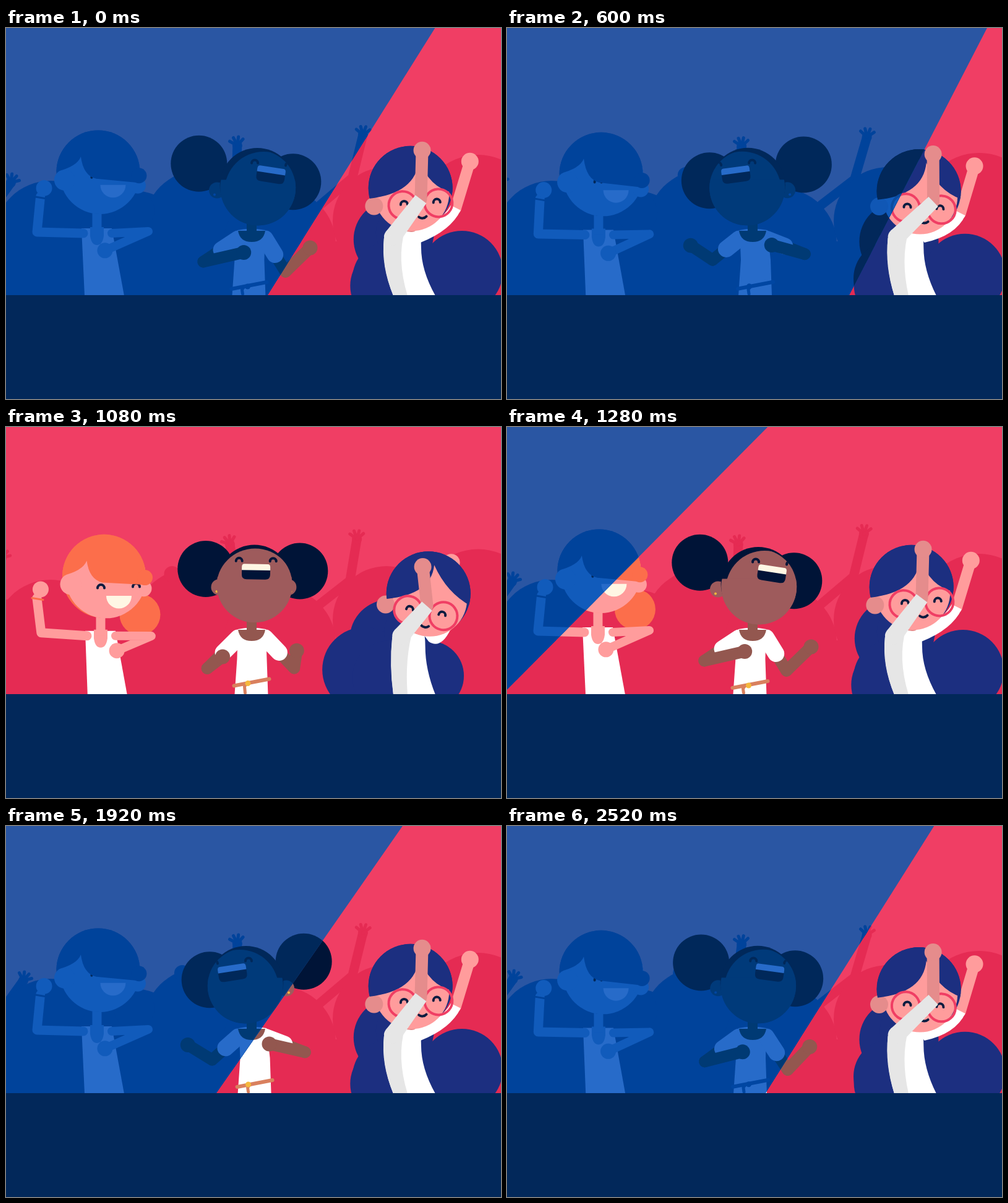
An HTML page with a canvas that plays this animation: 800x600 px, repeating every 2560 ms.

```html
<!DOCTYPE html>
<html lang="en">
<head>
<meta charset="utf-8">
<title>Dancing crowd</title>
<style>
  html, body { margin: 0; width: 100%; height: 100%; overflow: hidden; background: #02285a; }
  canvas { display: block; width: 800px; height: 600px; }
</style>
</head>
<body>
<canvas id="stage" width="800" height="600"></canvas>
<script>
const ctx = document.getElementById('stage').getContext('2d');
const LOOP = 2560, BEAT = 640, TAU = Math.PI * 2, FLOOR = 432;

// Each colour: [in red light, in blue light]
const colors = {
  bg: ['#f03e64', '#2a56a3'], crowd: ['#e52b53', '#00439b'],
  white: ['#ffffff', '#276bc9'], shade: ['#e6e6e6', '#2567c5'],
  skin: ['#ff9c9c', '#115bbb'], skinDark: ['#e58c8c', '#1057b5'],
  orange: ['#fc6e4b', '#00439b'], ink: ['#0a1c40', '#02285a'],
  brown: ['#9e5b5c', '#003a7a'], arm: ['#93574f', '#003a74'],
  black: ['#001437', '#00285a'], belt: ['#d9805e', '#0046a2'],
  gold: ['#f5b83d', '#0046a2'], teeth: ['#fff6e4', '#276bc9'],
  navy: ['#1c2f80', '#02285a'], frame: ['#f03e64', '#0b4ba0']
};
let mode = 0;
const col = name => colors[name][mode];

// Rhythm of the moment: w(mid, a, b) swings around mid once per beat
let w, bob;
function setBeat(t) {
  const c = Math.cos(TAU * t / BEAT);
  bob = -Math.sin(TAU * t / BEAT);
  w = (mid, a, b = 0) => mid + a * c + b * bob;
}

function circle(x, y, r) {
  ctx.beginPath();
  ctx.arc(x, y, r, 0, TAU);
}
function dot(c, x, y, r) {
  ctx.fillStyle = col(c);
  circle(x, y, r);
  ctx.fill();
}
function line(c, width, pts, cap = 'round') {
  ctx.strokeStyle = col(c);
  ctx.lineWidth = width;
  ctx.lineCap = cap;
  ctx.lineJoin = 'round';
  ctx.beginPath();
  pts.forEach(p => ctx.lineTo(p[0], p[1]));
  ctx.stroke();
}
function arc(c, width, x, y, r, from = Math.PI, to = TAU) {
  ctx.strokeStyle = col(c);
  ctx.lineWidth = width;
  ctx.lineCap = 'round';
  ctx.beginPath();
  ctx.arc(x, y, r, from, to);
  ctx.stroke();
}
function shape(c, d) {
  ctx.fillStyle = col(c);
  ctx.fill(new Path2D(d));
}
function group(x, y, angle, draw) {
  ctx.save();
  ctx.translate(x, y);
  ctx.rotate(angle);
  draw();
  ctx.restore();
}
function inCircle(x, y, r, draw) {
  group(x, y, 0, () => {
    circle(0, 0, r);
    ctx.clip();
    draw();
  });
}
const mix = (a, b, k) => a.map((v, i) => v + (b[i] - v) * k);

function crowdArm(hand, elbow, shoulder) {
  line('crowd', 15, [hand, elbow, shoulder]);
  const lean = Math.atan2(hand[0] - elbow[0], elbow[1] - hand[1]);
  group(hand[0], hand[1], lean, () => {
    dot('crowd', 0, 0, 8);
    for (let a = -1.1; a < 1; a += 0.6)
      line('crowd', 5, [[0, 0], [14 * Math.sin(a), -14 * Math.cos(a)]]);
  });
}

function crowd(t) {
  const slow = Math.sin(TAU * t / LOOP), half = Math.sin(TAU * t / 1280);
  crowdArm([w(559, 18, 16), w(173, 0, 9)], [w(553, 7, 6), w(242, 0, 7)], [508, 286]);
  crowdArm([w(353, 21, 18), w(187, 3, 4)], [372, 250], [360, 300]);
  const x = w(4, 4) - 20 * slow, y = w(222, 28);
  crowdArm([x, y], [x - 30, y + 42], [x - 50, y + 75]);

  const mid = 313 + 20 * half;
  dot('crowd', 4, w(290, 21, 18), 20);
  dot('crowd', 72, 338, 91);
  dot('crowd', 205, 356, 93);
  dot('crowd', mid, 320, 90);
  dot('crowd', mid - 28, 238, 13);
  dot('crowd', 442, 350, 91);
  dot('crowd', 615, 312, 87);
  dot('crowd', 763, w(301, 0, -8), 96);
  ctx.fillStyle = col('crowd');
  ctx.fillRect(0, 345, 800, 90);
}

function leftGirl() {
  const x = w(150.5, -1.5, 8), y = w(233, 0, 9);
  const fringeL = w(5, 6, 8), fringeR = w(6.5, 11.5, 13);
  const bx = w(150, -3, 2), top = w(323.5, 0.5, 7), low = w(130.5, -3.5);
  const hand = [w(61.5, 0, -6), w(255.5, 3.5, 9)], elbow = [w(55, -5), w(326, 4, 9)];
  const hand2 = [w(168.5, -8.5, 8), w(352.5, 7.5, 13)], elbow2 = [w(233.5, -3.5), w(327.5, 1.5, 12)];

  dot('orange', x + 58, y + 62, 33);
  shape('white', `M${bx - 25} ${top}H${bx + 24}L${low + 64} 433H${low}Z`);
  shape('skin', `M${bx - 11} ${top - 2}h22v14q-2 15 -11 15t-11 -15z`);
  line('skin', 15, [[bx, y + 55], [bx, top + 8]], 'butt');
  line('skin', 15, [[bx - 22, top + 8], elbow, [hand[0] - 6, hand[1] + 14]]);
  line('orange', 3, [[hand[0] - 14, hand[1] + 14], [hand[0] + 4, hand[1] + 17]]);
  line('skin', 14, [[bx + 24, top + 8], elbow2, hand2]);
  dot('skin', ...hand2, 12.5);

  dot('orange', x, y, 67.5);
  dot('skin', x + 3, y + 3, 65);
  dot('skin', x - 54, y + 13, 17);
  dot('skin', x + 64, y + 12 + fringeR * 0.55, 13);
  const eyeY = w(y + 9, 0, 11), mouthY = w(y + 20, 1, 13);
  arc('ink', 4, x - 5, eyeY, 5.5);
  arc('ink', 4, x + 52, eyeY - 2, 5.5);
  shape('teeth', `M${x + 3.5} ${mouthY}h41a20.5 20.5 0 0 1 -41 0z`);
  inCircle(x, y, 67.5, () => shape('orange',
    `M-80 -80H80V${fringeR}H72L-3 ${fringeL}Q-24 ${fringeL - 5} -28 -25Q-35 -6 -80 2Z`));
  dot('orange', x + 66, y + fringeR - 12, 12.5);
  dot('skin', ...hand, 13);
}

function middleGirl(t) {
  // turn runs from 1 (facing right) to -1 (facing left) over two beats
  const turn = 1.15 * Math.cos(TAU * (t - 100) / 1280), push = Math.sin(TAU * t / 1280);
  const fx = w(399.5 + 10 * turn, -2.5), fy = w(256, 2.5);
  const tx = 397 - 4.5 * turn, beltY = w(413.5, 2.5);
  const arms = [
    { s: [375, 341], e: [326 - 7 * turn, 378 - 15 * push],
      h: [w(336 + 44.5 * turn - 12 * push, 3), 358.5 + 4.5 * turn - 15 * push] },
    { s: [419, 341], e: [467.5 - 15.5 * turn, 380 + 14 * turn - 10 * push],
      h: [458.5 + 32.5 * turn - 9 * push, 354 + 1.5 * turn - 9 * push] }
  ];

  shape('white', `M${375 - turn} 327Q396 322 ${420 - turn} 327L${tx + 25} 375L${tx + 27} 433H${tx - 27}L${tx - 23} 375Z`);
  for (const a of arms) {
    line('arm', 19, [a.s, a.e]);
    line('white', 27, [a.s, mix(a.s, a.e, 0.48)]);
  }
  shape('arm', 'M375 328H419Q416 346 397 346T375 328Z');
  line('arm', 16, [[397, 305], [397, 332]], 'butt');
  line('belt', 6, [[tx - 28, beltY + 6], [tx + 29, beltY - 5]]);
  line('belt', 5, [[tx - 8, beltY + 3], [tx - 11, beltY + 7], [tx - 10, 430]]);
  dot('gold', tx - 6 + 4 * turn, beltY + 2, 4.5);
  for (const a of arms) {
    line('arm', 19, [a.e, a.h]);
    dot('arm', ...a.h, 12);
  }

  for (const side of [-1, 1]) {
    dot('black', 396.5 + side * 76 - 8.5 * turn - 4 * push, w(232, 2) + side * 14.5 * turn, 45.5);
  }
  for (const side of [-1, 1]) {
    dot('brown', fx + side * 56 - 10 * turn, fy + 4, 13);
    dot('gold', fx + side * 60 - 10 * turn, fy + 11, 2);
  }
  dot('black', fx - turn, fy - 4, 60.5);
  inCircle(fx, fy, 61, () => {
    dot('brown', 9 * turn, 4.5, 63);
    ctx.fillRect(-62, -13, 124, 80);
    for (const side of [-1, 1])
      arc('black', 4, 22 * turn + side * 27.5, -38 + side * 2 * turn, 5);
    group(20.5 * turn, -21.5, 0.15 * turn, () => {
      shape('black', 'M-23 -3H23V5Q23 13 15 13H-15Q-23 13 -23 5Z');
      shape('teeth', 'M-19 -12H19Q23 -12 23 -7V-2H-23V-7Q-23 -12 -19 -12Z');
    });
  });
}

function rightGirl() {
  const x = w(654, 0, 31), y = w(257, 2, 14);
  const sx = w(1.5, -1.5, 12);
  const hand = [w(641, 32, 48), w(209, -11, 14)], elbow = [w(641.5, 29.5, 54), w(279.5, -2.5, 10)];
  const hand2 = [w(713, 37, 22), w(203.5, 12.5, 22)], elbow2 = [w(701.5, 25.5, 20), w(302, -10, 20)];

  // long hair
  dot('navy', w(605, 21, 24), w(336, 6, 10), 64);
  dot('navy', w(577, 42, 20), w(399, 18), w(67, -4.5));
  dot('navy', w(686, 51, 18), w(392, 2, 12), w(59, 7));
  dot('navy', 645 + sx, 331, 47);
  dot('navy', 620, 405, 60);

  // far arm
  line('skin', 18, [elbow2, hand2]);
  dot('skin', ...hand2, 14);
  const [ex, ey] = elbow2;
  shape('white', `M${656 + sx} 328Q${ex - 24} ${ey + 24} ${ex - 8} ${ey - 5}L${ex + 8} ${ey + 3}`
    + `Q${ex - 8} ${ey + 36} ${670 + sx} 347Z`);

  // body
  const l = 611 + sx, r = 671 + sx / 2;
  shape('white', `M${l + 12} 326H${r - 4}Q${r} 335 ${r} 355Q${r} 392 694 433H626Q${l - 4} 385 ${l} 340Z`);
  shape('shade', `M${l + 12} 326H${l + 34}Q${l + 20} 374 649 433H626Q${l - 5} 385 ${l} 340Z`);
  line('skinDark', 20, [[642 + sx, 318], [656 + sx, 320]]);

  // head
  dot('navy', x, y, 68);
  dot('skin', x + 2, y + 9, 60.5);
  dot('skinDark', w(x - 57, -2, -14), w(y + 29, 0, -12), 14.5);
  inCircle(x, y, 68, () => {
    const part = 14 - 5 * bob;
    shape('navy', `M-80 -80H80V${8 + 14 * bob}H70Q30 0 ${part} -46Q${part - 5} ${9 - 8 * bob} -67 ${17 - 9 * bob}H-80Z`);
  });
  group(w(x + 16, 0, -22), w(y + 26, 0, 6), w(-6, 2.5, 18) * Math.PI / 180, () => {
    for (const side of [-1, 1]) {
      arc('frame', 4, side * 29, 0, 22.5, 0, TAU);
      arc('ink', 4, side * 26.5, -1, 5.5);
    }
    arc('frame', 4, 0, 0, 8, Math.PI * 1.15, Math.PI * 1.85);
    arc('ink', 4, 2, 14, 9, 0.8, 2.3);
  });

  // near arm
  line('skinDark', 20, [elbow, hand]);
  dot('skinDark', ...hand, 14);
  const dx = elbow[0] - 625 - sx, dy = elbow[1] - 338, len = Math.hypot(dx, dy);
  group(625 + sx, 338, Math.atan2(dy, dx), () => {
    dot('shade', 0, 0, 14);
    shape('shade', `M0 -14L${len} -11V11L0 14Z`);
  });
}

function scene(t, m) {
  mode = m;
  ctx.fillStyle = col('bg');
  ctx.fillRect(0, 0, 800, 600);
  crowd(t);
  leftGirl();
  middleGirl(t);
  rightGirl();
}

// Half-plane of blue light turning about a point beyond the top right:
// it lingers mid-stage and whips round between passes
function clipLight(t) {
  const u = ((t + 1520) % LOOP) / 1280 - 1;
  const deg = 56.9 + 5.5 * u + 18 * u ** 5 + 156.5 * u ** 25;
  ctx.translate(1160, -745);
  ctx.rotate(-deg * Math.PI / 180);
  ctx.beginPath();
  ctx.rect(-4000, -4000, 8000, 4000);
  ctx.clip();
  ctx.setTransform(1, 0, 0, 1, 0, 0);
}

function frame() {
  const t = performance.now() % LOOP;
  setBeat(t);
  scene(t, 0);
  ctx.save();
  clipLight(t);
  scene(t, 1);
  ctx.restore();
  ctx.fillStyle = '#02285a';
  ctx.fillRect(0, FLOOR, 800, 600 - FLOOR);
  requestAnimationFrame(frame);
}
frame();
</script>
</body>
</html>
```
